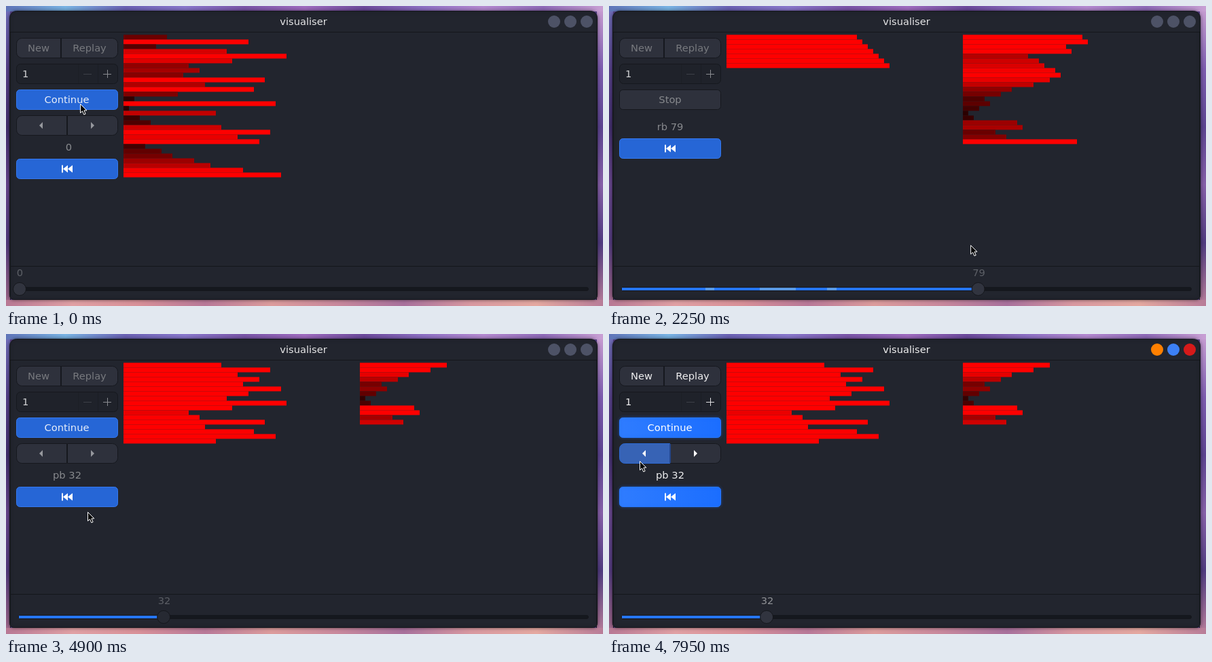
These frames come from a looping animation (879 px wide and 442 px high, 8 s). An HTML page with a canvas:

```html
<!DOCTYPE html>
<html>
<head>
<meta charset="utf-8">
<title>visualiser</title>
<style>
html, body { margin: 0; height: 100%; overflow: hidden; background: #4a3a78; }
canvas { display: block; }
</style>
</head>
<body>
<canvas id="stage" width="879" height="442"></canvas>
<script>
const ctx = document.getElementById('stage').getContext('2d');
const LOOP = 8000, FONT = '14.667px "DejaVu Sans", sans-serif';
const PLAY_START = 495, STEP_MS = 22, STOP_AT = 91, FOCUS_AT = 7000;
const START = [8, 23, 6, 19, 30, 20, 12, 14, 11, 26, 15, 24, 10, 2, 28,
  1, 17, 3, 5, 18, 27, 21, 25, 4, 7, 9, 13, 16, 22, 29];

// Two-stack sort: push the smallest third to B, then take the maximum back.
function solve(values) {
  const a = [...values], b = [], states = [];
  const moves = {
    pa: () => a.unshift(b.shift()), pb: () => b.unshift(a.shift()),
    ra: () => a.push(a.shift()), rb: () => b.push(b.shift()),
    rra: () => a.unshift(a.pop()), rrb: () => b.unshift(b.pop())
  };
  const run = op => {
    states.push({ a: [...a], b: [...b], op });
    moves[op]();
  };
  const bringUp = (stack, name, wanted) => {
    const up = stack.findIndex(wanted);
    const down = [...stack].reverse().findIndex(wanted) + 1;
    for (let i = Math.min(up, down); i > 0; i--) run((up <= down ? 'r' : 'rr') + name);
  };
  while (a.length) {
    const size = Math.floor(a.length / 3) + 1;
    const limit = [...a].sort((x, y) => x - y)[size - 1];
    if (a.length === 1) run('ra');
    for (let i = 0; i < size; i++) {
      bringUp(a, 'a', v => v <= limit);
      run('pb');
    }
  }
  while (b.length) {
    const max = Math.max(...b);
    bringUp(b, 'b', v => v === max);
    run('pa');
  }
  return states;
}
const states = solve(START);

// Keyframes [time, ...values], eased between neighbours.
function track(keys, t) {
  let i = 0;
  while (i < keys.length - 1 && keys[i + 1][0] <= t) i++;
  const from = keys[i], to = keys[i + 1];
  if (!to) return from.slice(1);
  const p = Math.max(0, (t - from[0]) / (to[0] - from[0]));
  const e = p * p * (3 - 2 * p);
  return from.slice(1).map((v, k) => v + (to[k + 1] - v) * e);
}
const POINTER = [[0, 109, 144], [400, 109, 144], [1050, 111, 149], [1300, 125, 151],
  [1800, 262, 174], [2480, 629, 416], [3100, 629, 416], [4350, 238, 417], [4500, 232, 410],
  [4900, 120, 262], [5350, 148, 170], [6250, 148, 170], [6800, 45, 187], [8000, 45, 187]];
const DRAG = [[3100, 91], [4300, 32]];
const CLICKS = [[5550, 1], [5850, 1], [6150, 1], [7050, -1], [7300, -1], [7550, -1]];

function stepAt(t) {
  if (t < DRAG[0][0]) return Math.max(0, Math.min(STOP_AT, Math.floor((t - PLAY_START) / STEP_MS)));
  return CLICKS.reduce((n, [at, d]) => t >= at ? n + d : n, Math.round(track(DRAG, t)[0]));
}

function gradient(x0, y0, x1, y1, colors) {
  const g = ctx.createLinearGradient(x0, y0, x1, y1);
  colors.forEach((c, i) => g.addColorStop(i / (colors.length - 1), c));
  return g;
}
function rect(x, y, w, h, fill) {
  ctx.fillStyle = fill;
  ctx.fillRect(x, y, w, h);
}
function box(x, y, w, h, radii, fill, stroke) {
  ctx.beginPath();
  ctx.roundRect(x + .5, y + .5, w - 1, h - 1, radii);
  ctx.fillStyle = fill;
  ctx.fill();
  ctx.lineWidth = 1;
  ctx.strokeStyle = stroke;
  ctx.stroke();
}
function circle(x, y, r, fill, stroke) {
  ctx.beginPath();
  ctx.arc(x, y, r, 0, 7);
  ctx.fillStyle = fill;
  ctx.fill();
  if (stroke) {
    ctx.strokeStyle = stroke;
    ctx.stroke();
  }
}
function polygon(points, fill) {
  ctx.beginPath();
  points.forEach(([x, y]) => ctx.lineTo(x, y));
  ctx.closePath();
  ctx.fillStyle = fill;
  ctx.fill();
}
function text(s, x, y, color, align = 'center') {
  ctx.font = FONT;
  ctx.textAlign = align;
  ctx.fillStyle = color;
  ctx.fillText(s, x, y);
}

function drawWallpaper() {
  rect(0, 0, 879, 442, '#5b478c');
  rect(0, 0, 879, 8, gradient(0, 0, 879, 0, ['#5f74b8', '#79b4e4', '#6b62b4', '#8a78cc',
    '#7a55a8', '#a06cc0', '#6c4a9c', '#8e70c4', '#b58ad0', '#8f6ab8', '#c9a0d4']));
  rect(0, 8, 6, 426, gradient(0, 8, 0, 434, ['#6f6cb8', '#58428c', '#443070', '#6a4890', '#543c80', '#a0688c']));
  rect(870, 8, 9, 426, gradient(0, 8, 0, 434, ['#c49ad0', '#7c5cae', '#5c4490', '#8660a8', '#503c80', '#b07898']));
  rect(0, 433, 879, 9, gradient(0, 0, 879, 0, ['#b87894', '#e0a0a4', '#d89098', '#b87898',
    '#dc9c9c', '#c8889c', '#a8709c', '#d898a0', '#e4a8a0', '#b87c98']));
}

function drawWindow(active) {
  ctx.shadowColor = 'rgba(0,0,0,.5)';
  ctx.shadowBlur = 5;
  box(5, 7, 866, 426, [10, 10, 6, 6], '#22252e', '#15171d');
  ctx.shadowBlur = 0;
  rect(6, 38, 864, 1, '#14161b');
  rect(6, 383, 864, 1, '#14161b');
  rect(6, 39, 1, 394, '#191b21');
  rect(869, 39, 1, 394, '#191b21');
  text('visualiser', 438, 28, active ? '#f0f0f0' : '#e6e6e7');
  const lights = active ? ['#ff8000', '#3c80f6', '#d61a1a'] : Array(3).fill('#4d5266');
  lights.forEach((c, i) => circle(807 + 24 * i, 23, 9, c));
}

function drawBars(stack, left) {
  stack.forEach((v, i) => {
    const red = Math.min(255, Math.round(30 + 290 * v / stack.length));
    rect(left, 42.4 + 7 * i, 8 * v, 7, `rgb(${red},0,0)`);
  });
}

function drawControls(state, n, playing, active, pointer) {
  const face = '#2e313c', edge = '#16181e';
  const dim = active ? '#eeeeef' : '#77797e';
  const blueButton = y => {
    if (active) {
      ctx.shadowColor = 'rgba(30,110,255,.4)';
      ctx.shadowBlur = 4;
    }
    box(15, y, 150, 30, 5, active ? gradient(15, 0, 165, 0, ['#2f7cff', '#1b6eff']) : '#2666d6',
      active ? '#2878ff' : '#3478ee');
    ctx.shadowBlur = 0;
  };
  box(15, 47, 150, 30, 8, face, edge);
  rect(80, 48, 2, 28, edge);
  text('New', 48, 67, dim);
  text('Replay', 123, 67, dim);

  box(15, 85, 150, 30, 6, '#1f222a', edge);
  rect(106, 86, 1, 28, '#1c1f26');
  rect(135, 86, 1, 28, '#1b1d24');
  text('1', 24, 105, active ? '#eeeeef' : '#d2d3d5', 'left');
  rect(114, 100, 12, 1, '#3d4048');
  const plus = active ? '#e0e0e2' : '#8a8c91';
  rect(143, 100, 12, 1, plus);
  rect(149, 94, 1, 12, plus);

  const labelColor = active ? '#eeeeef' : '#87898d';
  const shift = playing ? 0 : 30;
  if (playing) {
    box(15, 123, 150, 30, 5, face, edge);
    text('Stop', 90, 143, '#87898d');
  } else {
    blueButton(123);
    text('Continue', 89.5, 143, active ? '#ffffff' : '#e6edf9');
    const over = pointer[1] > 160 && pointer[1] < 192 && pointer[0] < 165;
    const hoverLeft = over && pointer[0] < 90, hoverRight = over && pointer[0] >= 90;
    const hot = active ? '#3763b5' : '#2b4579';
    box(15, 161, 75, 30, [8, 0, 0, 8], hoverLeft ? hot : face, hoverLeft && active ? '#2b68d2' : edge);
    box(90, 161, 75, 30, [0, 8, 8, 0], hoverRight ? hot : face, hoverRight ? '#24478c' : edge);
    rect(89, 162, 2, 28, hoverLeft || hoverRight ? '#24478c' : edge);
    const arrow = active ? '#ffffff' : '#96989d';
    polygon([[54, 171], [54, 181], [49, 176]], arrow);
    polygon([[125, 171], [125, 181], [130, 176]], arrow);
  }
  text(n ? `${state.op} ${n}` : '0', n ? 90 : 92.5, 183 + shift, labelColor);
  blueButton(195 + shift);
  const y = 210 + shift;
  rect(82, y - 5.5, 2, 11, '#fff');
  for (const x of [84, 91]) polygon([[x, y], [x + 7, y - 5.5], [x + 7, y + 5.5]], '#fff');
}

function drawSlider(n, t, active) {
  const x = 20 + n * 6.628;
  box(18, 414, 840, 6, 3, '#15181e', '#15171d');
  rect(19, 415, x - 19, 4, '#2676fa');
  if (t >= PLAY_START && t < 2500) {
    const patches = t < 1150 ? [[142, 188]] : [[142, 155], [222, 275], [321, 335]];
    for (const [l, r] of patches) if (x > l) rect(l, 415, Math.min(r, x) - l, 4, '#5b9ae4');
  }
  const held = t > 2500 && t < 5200;
  circle(x, 417, 9.5, held ? '#262932' : '#31343f', '#15171c');
  text(n, n ? x + 1 : 20.5, 398, active ? '#909296' : '#5c5f66');
}

function drawPointer([x, y]) {
  ctx.beginPath();
  [[0, 0], [0, 13], [3, 10.3], [5.3, 15.5], [7.6, 14.5], [5.4, 9.4], [9.4, 9.4]]
    .forEach(([dx, dy]) => ctx.lineTo(x + dx + .5, y + dy + .5));
  ctx.closePath();
  ctx.fillStyle = '#000';
  ctx.fill();
  ctx.lineWidth = 1;
  ctx.strokeStyle = '#fff';
  ctx.stroke();
}

function draw(t) {
  const n = stepAt(t), state = states[n];
  const playing = t >= PLAY_START && t < PLAY_START + STOP_AT * STEP_MS;
  const active = t >= FOCUS_AT, pointer = track(POINTER, t);
  drawWallpaper();
  drawWindow(active);
  drawBars(state.a, 173);
  drawBars(state.b, 521);
  drawControls(state, n, playing, active, pointer);
  drawSlider(n, t, active);
  drawPointer(pointer);
}

const began = performance.now();
function tick() {
  draw((performance.now() - began) % LOOP);
  requestAnimationFrame(tick);
}
tick();
</script>
</body>
</html>
```
